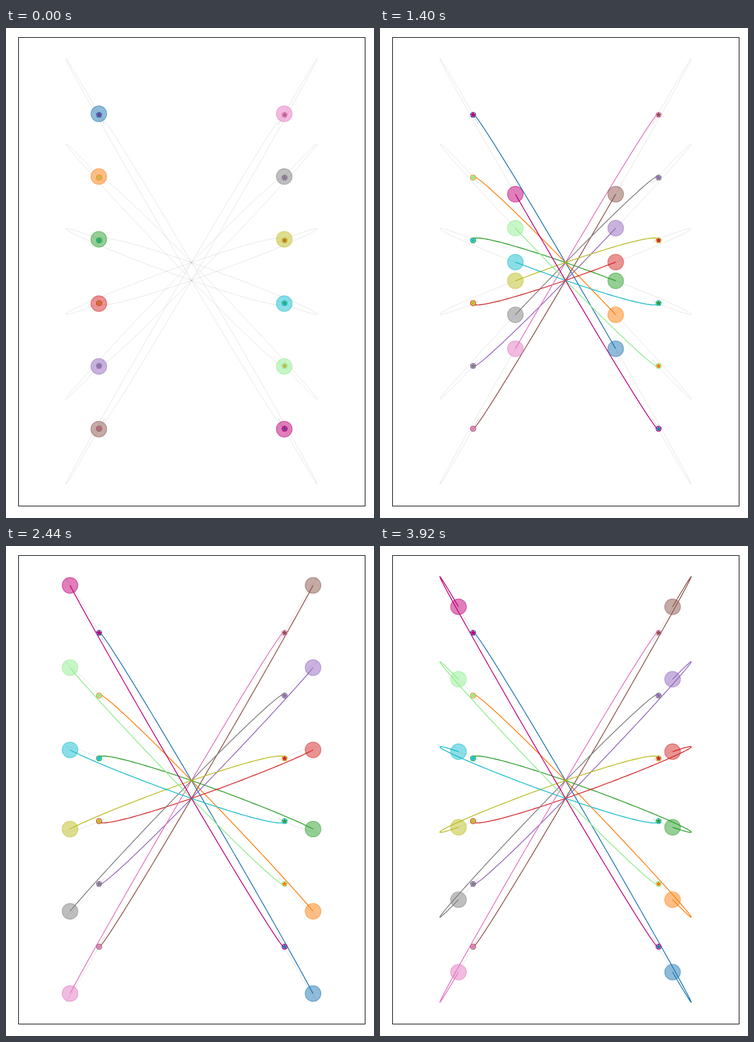
Write an HTML page with a canvas that moves like this. It is 600 px wide and 800 px high and loops after 3.96 s.

```html
<!DOCTYPE html>
<html lang="en">
<head>
<meta charset="utf-8">
<title>Agents swapping places</title>
<style>
  html, body { margin: 0; width: 100%; height: 100%; overflow: hidden; background: #fff; }
  canvas { display: block; }
</style>
</head>
<body>
<canvas id="stage" width="600" height="800"></canvas>
<script>
const ctx = document.getElementById('stage').getContext('2d');
const STEP_MS = 40, STEPS = 99, PLAN_STEPS = 200;
const CENTER = { x: 302.5, y: 397.5 };
const SIDE = 151.25, GAP = 102.5, RADIUS = 12.8;
const LINE = 100 / 72;
const COLORS = ['#1f77b4', '#ff7f0e', '#2ca02c', '#d62728', '#9467bd', '#8c564b',
                '#e377c2', '#7f7f7f', '#bcbd22', '#17becf', '#90ee90', '#c20078'];

const agents = COLORS.map((color, i) => ({
  color,
  dx: i < 6 ? -SIDE : SIDE,
  dy: (i % 6 - 2.5) * GAP,
}));

// Underdamped response: travel runs from -1 (start) past 1 (goal);
// drift is the decaying effect of an outward initial velocity.
const OMEGA = 0.0444, DECAY = 0.5503, KICK = 30;

function travel(step) {
  const a = OMEGA * (step + 0.47);
  return 1 - 2 * Math.exp(-DECAY * a) * (Math.cos(a) + DECAY * Math.sin(a));
}

function drift(step) {
  const a = OMEGA * (step + 1);
  return KICK * Math.exp(-DECAY * a) * Math.sin(a);
}

function position(agent, step) {
  const u = travel(step);
  return {
    x: CENTER.x - agent.dx * u,
    y: CENTER.y - agent.dy * u + Math.sign(agent.dy) * drift(step),
  };
}

function collides(points) {
  return points.some((p, i) =>
    points.slice(i + 1).some(q => Math.hypot(p.x - q.x, p.y - q.y) < 2 * RADIUS));
}

function strokePath(agent, lastStep, color, width) {
  ctx.beginPath();
  for (let s = -1; s <= lastStep; s++) {
    const p = position(agent, s);
    ctx.lineTo(p.x, p.y);
  }
  ctx.strokeStyle = color;
  ctx.lineWidth = width;
  ctx.stroke();
}

function ring(x, y, color) {
  ctx.beginPath();
  ctx.arc(x, y, 3 * LINE, 0, 2 * Math.PI);
  ctx.strokeStyle = color;
  ctx.lineWidth = LINE;
  ctx.stroke();
}

function star(x, y, color) {
  ctx.beginPath();
  for (let k = 0; k < 10; k++) {
    const r = 3 * LINE * (k % 2 ? 0.382 : 1);
    const a = k * Math.PI / 5 - Math.PI / 2;
    ctx.lineTo(x + r * Math.cos(a), y + r * Math.sin(a));
  }
  ctx.closePath();
  ctx.fillStyle = ctx.strokeStyle = color;
  ctx.lineWidth = LINE;
  ctx.fill();
  ctx.stroke();
}

function disc(p, color) {
  ctx.globalAlpha = 0.5;
  ctx.beginPath();
  ctx.arc(p.x, p.y, RADIUS, 0, 2 * Math.PI);
  ctx.fillStyle = ctx.strokeStyle = color;
  ctx.lineWidth = LINE;
  ctx.fill();
  ctx.stroke();
  ctx.globalAlpha = 1;
}

function draw(step) {
  const points = agents.map(a => position(a, step));
  const hit = collides(points);

  ctx.fillStyle = '#fff';
  ctx.fillRect(0, 0, 600, 800);
  if (hit) {
    ctx.fillStyle = '#fbe9ea';
    ctx.fillRect(20, 15, 566, 766);
  }

  ctx.lineJoin = 'round';
  agents.forEach(a => strokePath(a, PLAN_STEPS, 'rgba(0,0,0,0.15)', 0.7));
  agents.forEach(a => strokePath(a, step, a.color, LINE));

  ctx.lineJoin = 'bevel';
  const mx = CENTER.x + 0.5, my = CENTER.y + 0.5;
  agents.forEach(a => {
    ring(mx + a.dx, my + a.dy, a.color);
    star(mx - a.dx, my - a.dy, a.color);
  });
  agents.forEach((a, i) => disc(points[i], a.color));

  ctx.lineJoin = 'miter';
  ctx.strokeStyle = '#000';
  ctx.lineWidth = 1;
  ctx.strokeRect(20.5, 15.5, 565, 765);

  if (hit) {
    ctx.fillStyle = '#d62728';
    ctx.font = '50px "DejaVu Sans", sans-serif';
    ctx.textAlign = 'center';
    ctx.fillText('Collision!', CENTER.x, 66);
  }
}

const started = performance.now();
function tick() {
  const elapsed = Math.max(0, performance.now() - started);
  draw(Math.floor(elapsed / STEP_MS) % STEPS);
  requestAnimationFrame(tick);
}
tick();
</script>
</body>
</html>
```
